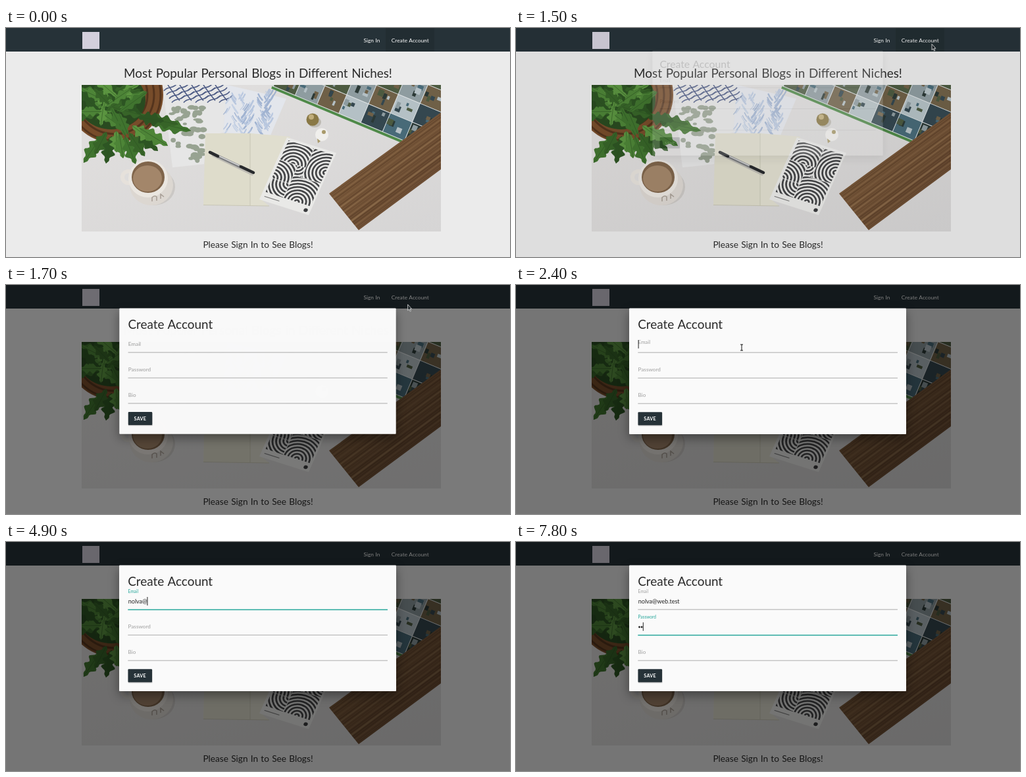
An HTML page for the animation above (8 s loop, 766 by 350 pixels).

```html
<!DOCTYPE html>
<html lang="en">
<head>
<meta charset="utf-8">
<title>Create Account</title>
<style>
  html, body { margin: 0; width: 100%; height: 100%; overflow: hidden; background: #ebebeb; }
  svg { display: block; }
  text { font-family: Lato, "Open Sans", sans-serif; word-spacing: .05em; white-space: pre; }
  .heading { font-size: 18.9px; fill: #2a2a2a; }
  .nav { font-size: 8.35px; fill: #fff; }
  .input { font-size: 9px; fill: #222; }
  .label { font-size: 8.2px; }
  #panel { filter: drop-shadow(0 6px 8px rgba(0, 0, 0, .4)); }
</style>
</head>
<body>
<svg width="766" height="350" viewBox="0 0 766 350">
  <defs>
    <linearGradient id="desk" x2="1" y2="1">
      <stop stop-color="#e2e0df"/><stop offset="1" stop-color="#d6d5d5"/>
    </linearGradient>
    <linearGradient id="wood" x2="1" y2="1">
      <stop stop-color="#84623f"/><stop offset="1" stop-color="#644630"/>
    </linearGradient>
  </defs>

  <rect width="766" height="350" fill="#ebebeb"/>
  <rect width="766" height="36" fill="#263238"/>
  <rect id="hover" x="577" width="74" height="36" fill="#000" opacity=".1"/>
  <rect x="116" y="6" width="26" height="26" fill="#d3cfdc"/>
  <text class="nav" x="543.5" y="21.5">Sign In</text>
  <text class="nav" x="585.8" y="21.5">Create Account</text>
  <text class="heading" x="383" y="76" text-anchor="middle">Most Popular Personal Blogs in Different Niches!</text>

  <svg x="115" y="87" width="546" height="224" viewBox="115 87 546 224">
    <rect x="115" y="87" width="546" height="224" fill="url(#desk)"/>
    <!-- printed sheets -->
    <path d="M238 87H336L330 160 305 165 301 208 253 213Z" fill="#e6e6e6"/>
    <path d="M336 87L426 108 402 164 330 160Z" fill="#e3e6ec"/>
    <g id="fronds" fill="none" stroke="#4d5b85" stroke-width="1.600"/>
    <g id="dye" fill="none" stroke-linecap="round" opacity=".75"/>
    <g id="sage" fill="#98a392"/>
    <g id="prints" transform="translate(405 88) rotate(22.700)">
      <path d="M0 5H260V-140H0Z" fill="#4f8a49"/>
      <path d="M0 1H260V-140H0Z" fill="#dfe3e5"/>
    </g>
    <!-- basket and plant -->
    <circle cx="165" cy="102" r="74" fill="#774c2a"/>
    <g fill="none" stroke="#54341d" stroke-width="3">
      <circle cx="165" cy="102" r="70"/><circle cx="165" cy="102" r="60"/><circle cx="165" cy="102" r="50"/>
    </g>
    <ellipse cx="160" cy="110" rx="52" ry="45" fill="#294a20"/>
    <g id="plant"/>
    <!-- notebook -->
    <path d="M303 161H372V272L300 270Z" fill="#dedccb"/>
    <path d="M372 161L432 166 388 262 400 272H372Z" fill="#e0decf"/>
    <path d="M371 161V272M300 270.500L400 272" stroke="#c8c6b6" fill="none"/>
    <!-- arch card -->
    <g id="card" transform="matrix(.987 .316 -.4 .905 427 167)">
      <path d="M0 0H76V105H0Z" fill="#e9e9e7"/>
    </g>
    <!-- pen -->
    <g stroke-linecap="round">
      <path d="M314 195L374 224" stroke="#bdbbb4" stroke-width="3"/>
      <path d="M310 190L356 212" stroke="#7c7e81" stroke-width="4.500"/>
      <path d="M318 193L354 210" stroke="#d5d5d5" stroke-width="1.500"/>
      <path d="M310 190L322 196M357 212L376 221" stroke="#282a2d" stroke-width="4.500"/>
    </g>
    <!-- knobs -->
    <ellipse cx="469" cy="144" rx="10" ry="8" fill="#bdbab3"/>
    <circle cx="466" cy="140" r="9.500" fill="#897845"/><circle cx="464" cy="136" r="4" fill="#c0ad7b"/>
    <circle cx="480" cy="163" r="10" fill="#f0efec"/><circle cx="483" cy="159" r="3" fill="#a8996a"/>
    <path d="M473 169L478 173 474 176Z" fill="#a8996a"/>
    <!-- plank -->
    <path d="M491 253L661 129V216L536 309Z" fill="url(#wood)"/>
    <g id="grain" opacity=".4"/>
    <!-- mug -->
    <ellipse cx="225" cy="243" rx="32" ry="28" fill="#cbc8c5"/>
    <circle cx="186" cy="228" r="9" fill="none" stroke="#e6e1db" stroke-width="6"/>
    <ellipse cx="221" cy="240" rx="33" ry="31" fill="#dcd7d1"/>
    <ellipse cx="216" cy="230" rx="30" ry="29" fill="#eae6e0"/>
    <ellipse cx="216" cy="228" rx="25" ry="24" fill="#7f644a"/>
    <ellipse cx="215" cy="230" rx="22" ry="20" fill="#a3866a"/>
    <path d="M222 265V259Q226 255 229 258V264M235 261V254L240 258" fill="none" stroke="#a69d94" stroke-width="1.500"/>
  </svg>

  <text x="383" y="336.300" text-anchor="middle" font-size="13.700" fill="#2a2a2a">Please Sign In to See Blogs!</text>
  <rect id="overlay" width="766" height="350"/>

  <g id="modal">
    <rect id="panel" x="172" y="35.500" width="421" height="192.500" rx="1" fill="#fafafa"/>
    <text class="heading" x="185.300" y="66.800">Create Account</text>
    <g id="fields"></g>
    <text id="email" class="input" x="185.800" y="94"></text>
    <g id="dots" fill="#222"></g>
    <rect id="caret" width="1" height="13" fill="#222"/>
    <rect x="185.500" y="195.500" width="37" height="20" rx="1" opacity=".25"/>
    <rect x="185.500" y="194.300" width="36.500" height="20" rx="1" fill="#263238"/>
    <text x="194.300" y="207" font-size="7.200" font-weight="700" letter-spacing=".3" fill="#fff">SAVE</text>
  </g>

  <path id="arrow" d="M.5 .5V9.500L2.500 7.700 4 11 5.300 10.400 3.900 7.200H6.500Z" fill="#1c2327" stroke="#e8e8e8" stroke-width=".8"/>
  <path id="beam" d="M-2 -4.500H2M0 -4.500V4.500M-2 4.500H2" fill="none" stroke="#111"/>
</svg>

<script>
const el = id => document.getElementById(id);
const add = (id, markup) => el(id).insertAdjacentHTML('beforeend', markup);
const clamp = x => Math.min(1, Math.max(0, x));
const show = (id, on) => el(id).setAttribute('visibility', on ? 'inherit' : 'hidden');

let seed = 7;
const random = () => (seed = seed * 16807 % 2147483647) / 2147483647;
const between = (low, high) => low + random() * (high - low);

// Photo details
function leaf(x, y, tipX, tipY, width, fill) {
  const dx = tipX - x, dy = tipY - y, len = Math.hypot(dx, dy);
  const edge = (k, side) => {
    const w = side * width * Math.sin(Math.PI * k) * (.8 + .3 * Math.sin(22 * k)) / len;
    return `${x + dx * k - dy * w} ${y + dy * k + dx * w}`;
  };
  const points = [];
  for (let k = 0; k <= 1; k += .05) points.push(edge(k, 1));
  for (let k = 1; k >= 0; k -= .05) points.push(edge(k, -1));
  add('plant', `<path d="M${points.join('L')}Z" fill="${fill}"/>
    <path d="M${x} ${y}L${tipX} ${tipY}" stroke="#2c5322" stroke-width=".6"/>`);
}
const greens = ['#2d5523', '#40742f', '#5b9440', '#376428', '#4d8437'];
for (let i = 0; i < 44; i++) {
  const angle = between(0, 6.28), r = between(35, 62);
  const x = between(142, 172), y = between(100, 130);
  leaf(x, y, x + Math.cos(angle) * r, y + Math.sin(angle) * r * .8, 8, greens[i % 5]);
}
[[118, 206], [135, 193], [152, 207], [168, 190], [178, 199], [197, 208], [211, 196], [231, 188],
 [222, 172], [246, 180], [281, 157], [262, 147], [240, 142]].forEach(([x, y], i) =>
  leaf(x * .45 + 92, y * .45 + 72, x, y, 11, greens[(i * 2 + 1) % 5]));

for (let i = 0; i < 55; i++)
  add('sage', `<ellipse cx="${between(252, 300)}" cy="${between(120, 204)}" rx="${between(3, 7)}" ry="${between(2, 4.5)}"/>`);

for (let i = 0; i < 5; i++) {
  const x = 246 + i * 18;
  let d = `M${x} 87q8 12 18 24`;
  for (let k = 0; k < 4; k++) d += `M${x + 3 + k * 4} ${91 + k * 6}q7 -1 11 -6m-11 6q-6 1 -9 5`;
  add('fronds', `<path d="${d}"/>`);
}
for (let i = 0; i < 110; i++) {
  const y = between(94, 156), x = between(340, 412) - (y - 94) * .12;
  const slant = Math.floor(x / 18) % 2 ? 6 : -6;
  add('dye', `<path d="M${x} ${y}q${slant / 3} 5 ${slant} 9" stroke="${['#8ba3c9', '#a9bcda', '#bccbe2'][i % 3]}" stroke-width="${between(1, 3)}"/>`);
}

const tones = ['#4c5a40', '#34474f', '#8e9ca0', '#486a78', '#6f6047', '#2b3936', '#b4c0c5'];
for (let row = 0; row < 5; row++)
  for (let col = 0; col < 7; col++) {
    const x = 2 + col * 36, y = -30 - row * 31, tone = (row * 3 + col * 2) % 7;
    add('prints', `<rect x="${x}" y="${y}" width="35" height="30" fill="${tones[tone]}"/>`);
    for (let i = 0; i < 5; i++)
      add('prints', `<rect x="${x + between(0, 26)}" y="${y + between(2, 18)}" width="${between(3, 9)}" height="${between(4, 12)}" fill="${tones[(tone + i) % 7]}"/>`);
  }

// Each tile: x, y, width, height, then the centre of its arches
[[4, 4, 39, 32, 20, 34], [44, 4, 29, 48, 29, 30], [4, 37, 27, 30, 0, 30],
 [32, 53, 41, 38, 20, 38], [4, 68, 27, 23, 27, 0], [32, 37, 11, 15, 0, 0]].forEach(([x, y, w, h, cx, cy]) => {
  let rings = '';
  for (let r = 3; r < 60; r += 5.2) rings += `<circle cx="${cx}" cy="${cy}" r="${r}"/>`;
  add('card', `<svg x="${x}" y="${y}" width="${w}" height="${h}" fill="none" stroke="#444547" stroke-width="2.6">${rings}</svg>`);
});
add('card', '<circle cx="69" cy="99" r="3" fill="#3a3b3d"/><path d="M5 98H28" stroke="#777"/>');

for (let i = 1; i < 24; i++) {
  const k = i / 24;
  add('grain', `<path d="M${491 + 45 * k} ${253 + 56 * k}L661 ${129 + 87 * k}" stroke="${i % 3 ? '#4b321f' : '#a98a62'}" stroke-width="${between(.5, 2.5)}"/>`);
}

// Form
const fieldNames = ['Email', 'Password', 'Bio'];
add('fields', fieldNames.map((name, i) =>
  `<text class="label" id="label${i}">${name}</text><rect id="line${i}" x="185.3" width="394.700"/>`).join(''));

const address = 'nolva@web.test';
const emailKeys = [3500, 3600, 3800, 4100, 4200, 4900, 5500, 5600, 5800, 5900, 6100, 6700, 6800, 6900];
const passwordKeys = [7600, 7800];
const focusTimes = [2375, 7075, Infinity];
const easeOut = x => 1 - (1 - clamp(x)) ** 1.75;

function drawField(i, t) {
  const since = t - focusTimes[i];
  const teal = since > 60 && t < focusTimes[i + 1];
  const lift = easeOut(since / 200);
  const label = el('label' + i), line = el('line' + i);
  label.setAttribute('transform', `translate(185.5 ${93.4 + 38.9 * i - 15.6 * lift}) scale(${1 - .2 * lift})`);
  label.setAttribute('fill', teal ? '#26a69a' : '#9e9e9e');
  line.setAttribute('y', 102.7 + 39 * i);
  line.setAttribute('height', teal ? 1.5 : .9);
  line.setAttribute('fill', teal ? '#26a69a' : '#a2a2a2');
}

function drawCaret(t) {
  const inPassword = t >= focusTimes[1];
  const typed = emailKeys.filter(k => k <= t).length, dots = passwordKeys.filter(k => k <= t).length;
  el('email').textContent = address.slice(0, typed);
  el('dots').innerHTML = passwordKeys.slice(0, dots).map((_, i) =>
    `<circle cx="${187.5 + 3.6 * i}" cy="130" r="1.4"/>`).join('');
  const last = Math.max(...[2400, 7100, ...emailKeys, ...passwordKeys].filter(k => k <= t));
  show('caret', t >= 2400 && (t - last) % 1060 < 500);
  const width = inPassword ? 3.6 * dots : typed && el('email').getComputedTextLength();
  el('caret').setAttribute('x', 185.6 + width);
  el('caret').setAttribute('y', inPassword ? 122.8 : 84);
}

function drawPointer(t) {
  const move = clamp((t - 1600) / 600), k = move * move * (3 - 2 * move);
  const x = 631.5 - 288.5 * k, y = 24 + 71.5 * k;
  const overInput = x < 580 && y > 80;
  show('hover', t < 1700);
  show('arrow', t >= 1400 && !overInput);
  show('beam', overInput && t < 2600);
  for (const id of ['arrow', 'beam']) el(id).setAttribute('transform', `translate(${x} ${y})`);
}

function draw() {
  const t = Math.floor(performance.now() % 8000 / 100) * 100;
  const left = 1 - clamp((t - 1485) / 265), open = 1 - left ** 3;
  el('overlay').setAttribute('opacity', .5 * (1 - left ** 2));
  el('modal').setAttribute('opacity', open);
  el('modal').setAttribute('transform',
    `translate(382.5 ${131.7 - 20 * (1 - open)}) scale(${.8 + .2 * open}) translate(-382.5 -131.7)`);
  fieldNames.forEach((_, i) => drawField(i, t));
  drawCaret(t);
  drawPointer(t);
  requestAnimationFrame(draw);
}
draw();
</script>
</body>
</html>
```
